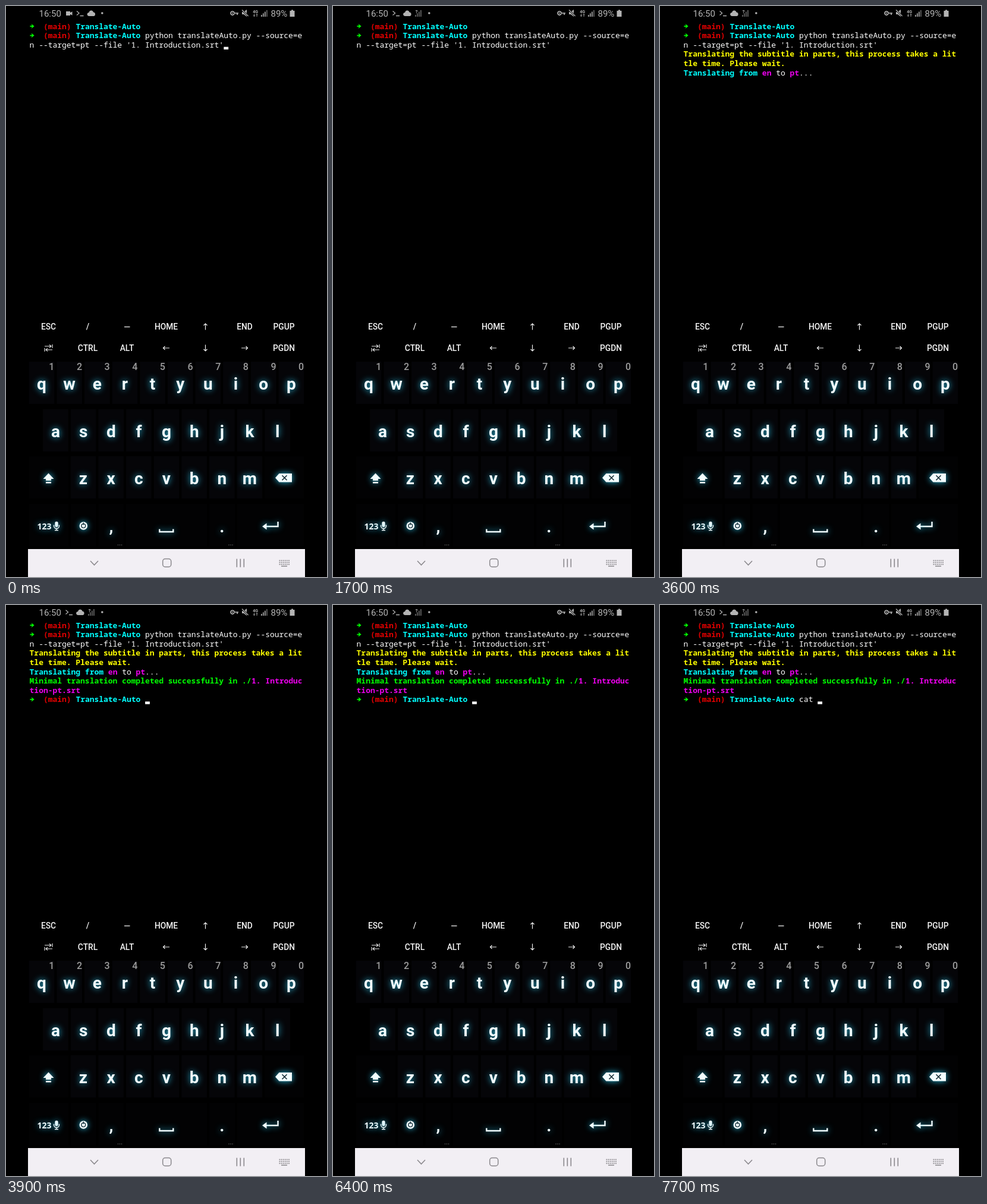
Recreate the animation shown at these times as an HTML page with a canvas. Size 540x960 px, loop 8 s.

```html
<!DOCTYPE html>
<html>
<head>
<meta charset="utf-8">
<style>
html, body { margin: 0; height: 100%; overflow: hidden; background: #000; }
canvas { display: block; width: 540px; height: 960px; }
</style>
</head>
<body>
<canvas id="stage" width="540" height="960"></canvas>
<script>
const c = document.getElementById('stage').getContext('2d');
const LOOP = 8000, PITCH = 7.78, KEY = 46.65;
const MONO = '12.967px "Noto Sans Mono", "DejaVu Sans Mono", monospace';
const SANS = 'px Roboto, "Open Sans", sans-serif';
const GREEN = '#0f0', RED = '#e60000', CYAN = '#0ff', YELLOW = '#ff0', PINK = '#ee00ee', WHITE = '#fff';
const GLOW = '#28bce0';

function rect(x, y, w, h, color) {
  c.fillStyle = color;
  c.fillRect(x, y, w, h);
}
function text(s, x, y, font, color, align = 'center') {
  c.font = font;
  c.textAlign = align;
  c.fillStyle = color;
  c.fillText(s, x, y);
}
function stroke(d, color, width) {
  c.strokeStyle = color;
  c.lineWidth = width;
  c.stroke(new Path2D(d));
}
function fill(d, color) {
  c.fillStyle = color;
  c.fill(new Path2D(d), 'evenodd');
}
function disc(x, y, r, color) {
  c.fillStyle = color;
  c.beginPath();
  c.arc(x, y, r, 0, 7);
  c.fill();
}
function at(x, y, draw) {
  c.save();
  c.translate(x, y);
  draw();
  c.restore();
}

// Terminal
const baseline = row => 38.5 + 15.6 * row;
const colX = col => 39.6 + PITCH * col;

function line(row, ...parts) {
  let col = 0;
  for (const [s, color] of parts) {
    if (s === '➜') at(colX(col), baseline(row) - 4.5, () => {
      stroke('M.8 0H5', color, 1.8);
      fill('M3 -4L8 0L3 4L4.4 0Z', color);
    });
    else text(s, colX(col), baseline(row), (color === WHITE ? '' : 'bold ') + MONO, color, 'left');
    col += s.length;
  }
}
function prompt(row, command) {
  line(row, ['➜', GREEN], ['  (main)', RED], [' Translate-Auto ', CYAN], [command, WHITE]);
}

function terminal(t) {
  const typed = 'cat '.slice(0, t < 6600 ? 0 : t < 6700 ? 1 : t < 6800 ? 2 : t < 7100 ? 3 : 4);
  prompt(0, '');
  prompt(1, 'python translateAuto.py --source=e');
  line(2, ["n --target=pt --file '1. Introduction.srt'", WHITE]);
  if (t >= 2800) {
    line(3, ['Translating the subtitle in parts, this process takes a lit', YELLOW]);
    line(4, ['tle time. Please wait.', YELLOW]);
    line(5, ['Translating from ', CYAN], ['en', PINK], [' to ', WHITE], ['pt', PINK], ['...', WHITE]);
  }
  if (t >= 3700) {
    line(6, ['Minimal translation completed successfully in ./', GREEN], ['1. Introduc', PINK]);
    line(7, ['tion-pt.srt', PINK]);
  }
  if (t >= 3900) prompt(8, typed);

  const typing = t >= 6100 && t < 7300;
  if (typing || (t + 300) % 800 < 400) {
    const [row, col] = t < 900 ? [2, 42] : t < 2800 ? [3, 0] : t < 3700 ? [6, 0]
      : [8, t < 3900 ? 0 : 25 + typed.length];
    rect(colX(col), baseline(row) - 1, PITCH, 4.4, WHITE);
  }
}

// Status bar
function shell(x) { stroke(`M${x} 8.5l4 3.5l-4 3.5M${x + 5.5} 16.5h6`, '#b0b0b0', 1.3); }
function cloud(x) {
  at(x, 0, () => fill('M3.5 17C-1 17 -1 11 3 11C4 6.5 9.5 6.5 10.5 10.5C14.5 10.5 14.5 17 11 17Z', '#b4b4b4'));
}
function bars(x, n) {
  for (let i = 0; i < 4; i++) rect(x + i * 3, 15 - i * 2.7, 1.7, 3 + i * 2.7, i < n ? '#a8a8a8' : '#666');
}
function statusBar(t) {
  const grey = '#b4b4b4';
  text('16:50', 55.5, 18, '15' + SANS, grey, 'left');
  if (t < 100) {
    fill('M101 9h7v2.3l3.5 -2v6.4l-3.5 -2v2.3h-7Z', grey);
    shell(119);
    cloud(136.5);
  } else {
    shell(100.5);
    cloud(118);
    bars(138, 0);
    text('?', 140.5, 12, 'bold 8' + SANS, grey);
  }
  disc(161.8, 12, 1.8, grey);

  stroke('M384 12H391M389 12V15M384 12a3 3 0 1 0 -.1 .8', grey, 1.7);
  disc(381, 12, 1, grey);
  fill('M397 10h3l5 -4v12l-5 -4h-3Z', grey);
  stroke('M396.5 6L408 17.5', '#000', 3);
  stroke('M397 6.5L407.5 17', grey, 1.3);
  text('4G', 419.7, 11.5, 'bold 7' + SANS, grey);
  stroke('M417.5 13v4.5m-1.6 -1.7l1.6 1.7l1.6 -1.7M422 18v-4.5m-1.6 1.7l1.6 -1.7l1.6 1.7', '#999', 1);
  bars(429, 3);
  text('89%', 445.5, 18, '15' + SANS, grey, 'left');
  fill('M480 6.5h3v1.5h2.5v10h-8v-10h2.5Z', grey);
}

// Extra key rows
function extraKeys() {
  const x = i => 71.5 + 66 * i;
  const label = (s, i, y) => text(s, x(i), y, '500 13.8' + SANS, '#f4f4f4');
  ['ESC', '/', '', 'HOME', '', 'END', 'PGUP'].forEach((s, i) => label(s, i, 544));
  ['', 'CTRL', 'ALT', '', '', '', 'PGDN'].forEach((s, i) => label(s, i, 580));
  stroke('M199 539.5h9.5', '#eee', 1.3);
  const arrow = (i, y, turn) => at(x(i), y, () => {
    c.rotate(turn * Math.PI / 2);
    stroke('M-5.5 0H5M2 -3L5 0L2 3', '#eee', 1.2);
  });
  arrow(4, 539, 3);
  arrow(3, 575, 2);
  arrow(4, 575, 1);
  arrow(5, 575, 0);
  stroke('M65 572h11m-3 -2.7l3 2.7l-3 2.7M78 569v6M78 578h-11m3 -2.7l-3 2.7l3 2.7M65 575v6', '#eee', 1.1);
}

// Keyboard
function keyBox(x, y, w, dark) { rect(x, y, w, 71, dark ? '#020203' : '#050508'); }

function pressed(x, y, w, amount) {
  c.globalAlpha = amount;
  rect(x, y, w, 71, '#020e14');
  for (let i = 2; i < w; i += 3) rect(x + i, y, 1, 71, '#04151c');
  c.globalAlpha = 1;
}

function keyboard(t) {
  const rows = [['qwertyuiop', 60, 598], ['asdfghjkl', 83.5, 678], ['zxcvbnm', 130, 757]];
  for (const [keys, x, y] of rows) [...keys].forEach((k, i) => keyBox(x + KEY * i - 21.3, y, 42.6));
  for (const [x, y, w] of [[39, 757, 66], [435, 757, 66], [39, 837, 66], [389, 837, 112]]) keyBox(x, y, w, true);
  for (const [x, w] of [[109, 42.5], [155.5, 42.5], [202, 136], [342, 43]]) keyBox(x, 837, w, true);

  if (t >= 800 && t < 1300) pressed(389, 837, 112, t < 1000 ? 1 : 0.5);
  if (t >= 6500 && t < 6600) pressed(202, 757, 42.6, 1);
  if (t >= 6600 && t < 6700) pressed(62.2, 678, 42.6, 1);
  if (t >= 6700 && t < 6800) pressed(225.3, 598, 42.6, 1);
  if (t >= 7000 && t < 7300) pressed(202, 837, 136, t < 7200 ? 1 : 0.5);

  for (let i = 0; i < 10; i++) text((i + 1) % 10, 76.8 + KEY * i, 612, '500 16' + SANS, '#9c9c9c');

  c.shadowColor = GLOW;
  c.shadowBlur = 11;
  const ink = '#f2fdff';
  for (const [keys, x, y] of rows)
    [...keys].forEach((k, i) => text(k, x + KEY * i, y + 47, 'bold 28' + SANS, ink));
  text(',', 177, 884, 'bold 28' + SANS, ink);
  text('.', 363.3, 884.5, 'bold 28' + SANS, ink);
  text('123', 64.5, 879.5, 'bold 14px "Open Sans", sans-serif', ink);

  fill('M71.5 785.5L80.5 795H76V798H67V795H62.5ZM67 800h9v2.5h-9Z', ink);
  fill('M453 793.2L459.5 786H481V800.5H459.5Z', ink);
  disc(130.3, 874, 6.8, ink);
  stroke('M258.3 879.5V884H281.3V879.5', ink, 2.4);
  stroke('M457.5 867V875H436', ink, 2.4);
  fill('M431 875L438.5 869.5V880.5Z', ink);
  fill('M82.3 869.5a2.7 2.7 0 0 1 5.4 0v4a2.7 2.7 0 0 1 -5.4 0Z', ink);
  stroke('M80.5 872.5v1.5a4.5 4.5 0 0 0 9 0v-1.5M85 878.5v3M82 881.5h6', ink, 1.4);
  c.shadowBlur = 0;

  stroke('M464.5 789.2l8 8m0 -8l-8 8', '#102830', 1.6);
  c.strokeStyle = '#14303a';
  c.lineWidth = 1.4;
  c.beginPath();
  c.arc(130.3, 874, 3.4, 0, 7);
  c.stroke();
  stroke('M130.3 868.5v4', '#14303a', 1.4);
  for (const x of [191.5, 378]) for (const d of [-3, 0, 3]) rect(x + d - 0.6, 905.5, 1.2, 1.2, '#777');
}

function navBar() {
  const grey = '#8a888c';
  rect(37, 913, 466, 47, '#f2eff4');
  stroke('M142 933L148.5 939.8L155 933', grey, 1.5);
  c.strokeStyle = grey;
  c.beginPath();
  c.roundRect(263.7, 929.5, 14, 13.5, 4);
  c.stroke();
  stroke('M388.3 929.5v14M394.3 929.5v14M400.3 929.5v14', grey, 1.6);
  for (let r = 0; r < 3; r++)
    for (let i = 0; i < 6; i++) rect(459.5 + i * 3.1, 931.5 + r * 3.2, 1.8, 1.8, grey);
  rect(463, 941, 10, 1.5, grey);
}

function frame(now) {
  const t = now % LOOP;
  rect(0, 0, 540, 960, '#000');
  statusBar(t);
  terminal(t);
  extraKeys();
  keyboard(t);
  navBar();
  requestAnimationFrame(frame);
}
frame(0);
</script>
</body>
</html>
```
